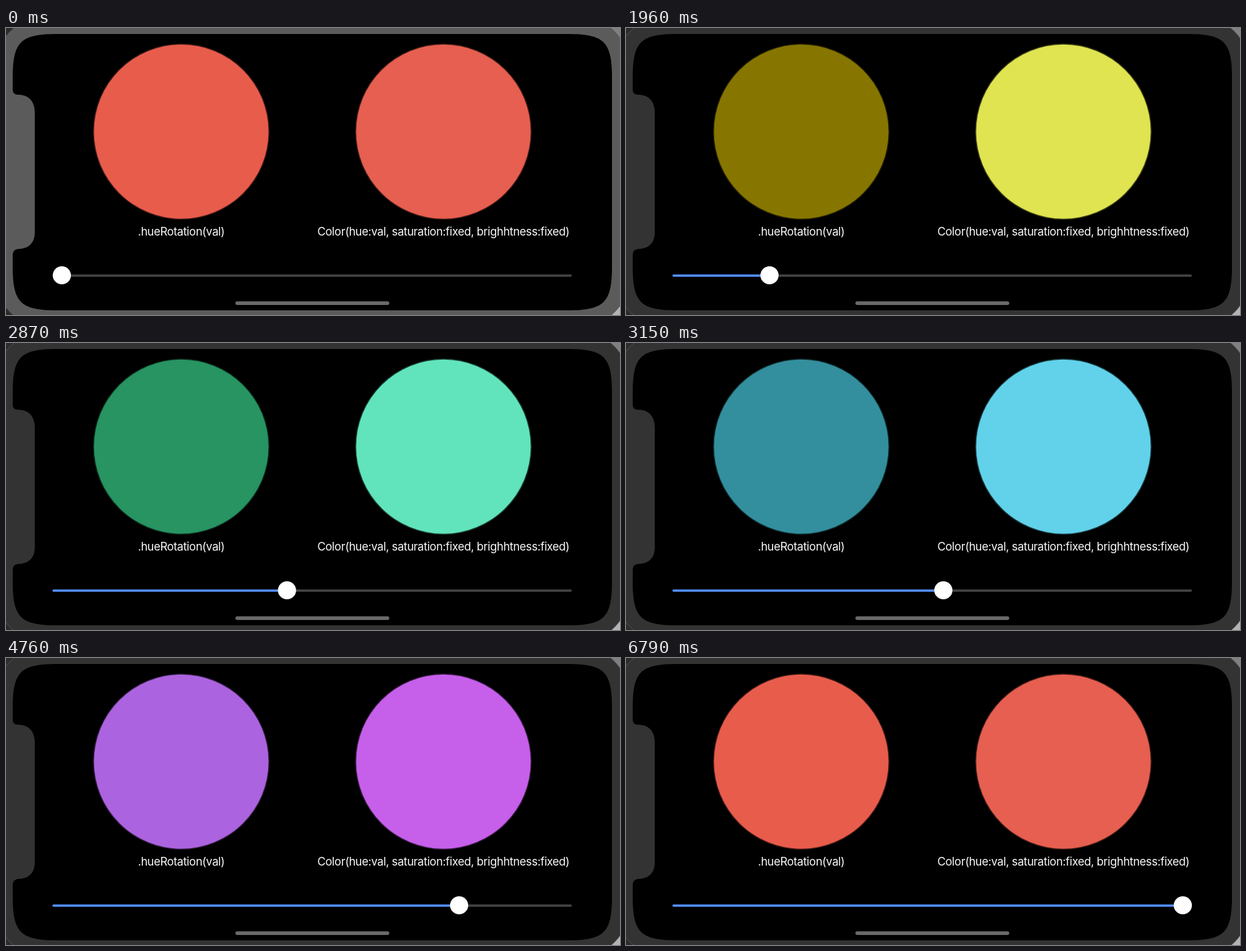
Recreate the animation shown at these times as an HTML page. Size 918 by 430 pixels, loop 6930 ms.

```html
<!DOCTYPE html>
<html lang="en">
<head>
<meta charset="utf-8">
<title>Hue slider</title>
<style>
  html, body { margin: 0; width: 100%; height: 100%; overflow: hidden; background: #333; }
  svg { display: block; width: 918px; height: 430px; }
  text { font: 17px Inter, "Noto Sans", sans-serif; letter-spacing: -.4px; fill: #fafafa; text-anchor: middle; }
  .disc { stroke-width: 3px; stroke-opacity: .25; }
  .case { fill: #333; animation: case 6930ms step-end infinite; }
  @keyframes case { 0% { fill: #5b5b5b; } 6.06%, 100% { fill: #333; } }
</style>
</head>
<body>
<svg viewBox="0 0 918 430">
  <rect width="918" height="430" fill="#2c2c2c"/>
  <rect x="880" width="38" height="215" fill="#808080"/>
  <rect x="880" y="215" width="38" height="215" fill="#b4b4b4"/>
  <rect class="case" x="-14" y="-15" width="944" height="461" rx="69" stroke="#555"/>
  <path d="M76 9H840C894.4 9 906 20.6 906 75V357C906 411.4 894.4 423 840 423H76C21.6 423 10 411.4 10 357V75C10 20.6 21.6 9 76 9Z"/>
  <path class="case" d="M9 92H10Q10 100 18 100C34 100 43 110 43 126V306C43 322 34 331 18 331Q10 332 10 340H9Z"/>
  <circle id="rotated" class="disc" cx="262" cy="155.3" r="130.5"/>
  <circle id="direct" class="disc" cx="654" cy="155.3" r="130.5"/>
  <text x="262" y="310.5">.hueRotation(val)</text>
  <text x="654" y="310.5">Color(hue:val, saturation:fixed, brighhtness:fixed)</text>
  <rect x="69.5" y="369.3" width="776.5" height="3.4" rx="1.7" fill="#444"/>
  <rect id="fill" x="69.5" y="369.3" height="3.4" rx="1.7" fill="#5794fa" stroke="#1d3f9e" stroke-opacity=".5"/>
  <circle id="knob" cy="370.5" r="13.6" fill="#fff"/>
  <rect x="343" y="409.5" width="230" height="5.5" rx="2.75" fill="#6a6a6a"/>
</svg>
<script>
const LOOP = 6930, STEP = 70, START = 83.5, SPAN = 749, TRACK = 69.5;
const $ = id => document.getElementById(id);
const clamp = (v, lo, hi) => Math.min(hi, Math.max(lo, v));
const cos = deg => Math.cos(deg * Math.PI / 180);
const rgb = (...parts) => `rgb(${parts.map(v => Math.round(clamp(v, 0, 255)))})`;

// the drag: [time, slider value]
const drag = [[420, 0], [1050, .016], [1960, .175], [3150, .522], [4760, .793], [6790, 1]];

// smooth path through the drag points, at rest at both ends
function valueAt(t) {
  const last = drag.length - 1;
  t = clamp(t, drag[0][0], drag[last][0]);
  const i = Math.max(0, drag.findIndex(p => p[0] >= t) - 1);
  const speed = k => {
    if (k === 0 || k === last) return 0;
    const [a, b] = [drag[k - 1], drag[k + 1]];
    return (b[1] - a[1]) / (b[0] - a[0]);
  };
  const [[t0, v0], [t1, v1]] = [drag[i], drag[i + 1]];
  const h = t1 - t0, u = (t - t0) / h, w = 1 - u;
  return Math.max(0, w * w * ((1 + 2 * u) * v0 + u * h * speed(i))
    + u * u * ((1 + 2 * w) * v1 - w * h * speed(i + 1)));
}

// hue rotation: each channel swings as a wave round its mean
function rotated(deg) {
  return rgb(
    127 + 98 * cos(deg + 19) + 12 * cos(2 * deg),
    118.5 + 29.4 * cos(deg - 154.5),
    108 + 132 * cos(deg - 256)
  );
}

// plain hue wheel: each channel ramps between its floor and ceiling
function direct(deg) {
  const ramp = (peak, lo, hi) => {
    const away = Math.abs((deg - peak + 540) % 360 - 180);
    return lo + (hi - lo) * clamp(2 - away / 60, 0, 1);
  };
  return rgb(ramp(0, 97, 230), ramp(120, 95, 228), ramp(240, 80, 234));
}

function draw() {
  const now = document.timeline.currentTime ?? performance.now();
  const val = valueAt(Math.floor(now % LOOP / STEP) * STEP);
  const x = START + SPAN * val;
  const paint = (id, color) => {
    $(id).setAttribute("fill", color);
    $(id).setAttribute("stroke", color);
  };
  $("knob").setAttribute("cx", x);
  $("fill").setAttribute("width", val > 0 ? x - TRACK : 0);
  paint("rotated", rotated(360 * val));
  paint("direct", direct(360 * val));
  requestAnimationFrame(draw);
}
draw();
</script>
</body>
</html>
```
